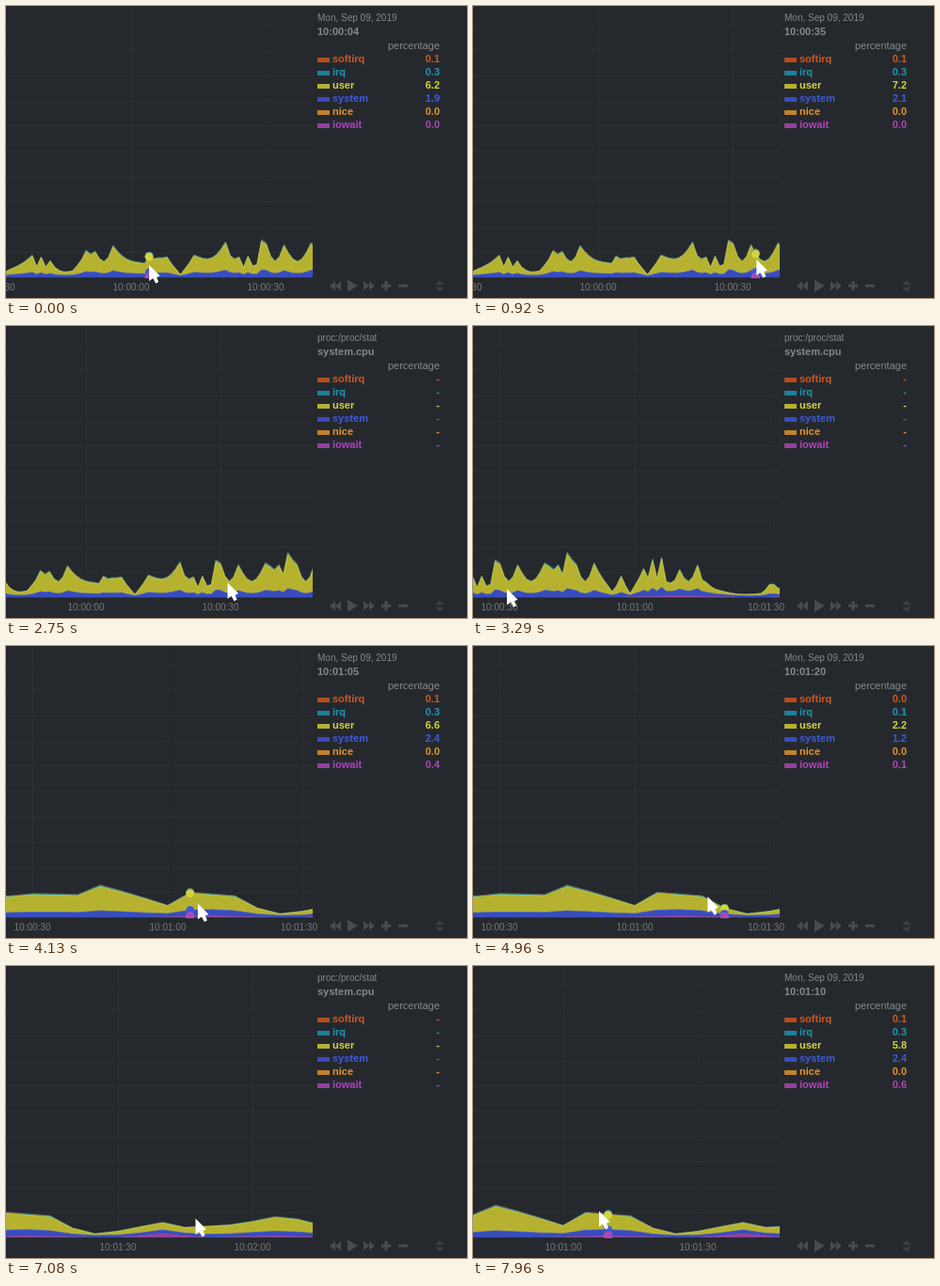
These frames come from a looping animation (490x311 px, 8000 ms). An HTML page with a canvas:

```html
<!DOCTYPE html>
<html lang="en">
<head>
<meta charset="utf-8">
<title>CPU chart</title>
<style>
html, body { margin: 0; width: 100%; height: 100%; overflow: hidden; background: #25292d; }
canvas { display: block; }
</style>
</head>
<body>
<canvas id="stage" width="490" height="311"></canvas>
<script>
const ctx = document.getElementById('stage').getContext('2d');
const LOOP = 8000, BASE = 289, RIGHT = 326, SEC = 4.78, PCT = 2.69;
const BACK = '#25292d', GREY = '#85888b', FONT = '"Liberation Sans", Arial, sans-serif';

// Stacked from top to bottom: name, line colour, fill colour
const series = [
  ['softirq', '#d4561a', '#b34d1e'], ['irq', '#1c96b4', '#1e8099'],
  ['user', '#d4d43a', '#b6b22f'], ['system', '#3f5adc', '#384cbc'],
  ['nice', '#e6932a', '#c0802b'], ['iowait', '#b044be', '#943fa2']
];

// Busy moments: second after 10:00:00, height in pixels
const peaks = [
  [-28, 6], [-22, 24], [-20, 22], [-18, 18], [-17, 11], [-13, 7], [-10, 29], [-9, 25],
  [-8, 28], [-4, 34], [3, 15], [4, 22.9], [5, 20], [6, 21], [7, 21], [8, 22], [11, 3],
  [14, 24], [21, 38], [24, 22], [26, 23], [28, 14], [29, 40], [30, 37], [34, 35], [40, 37],
  [41, 34], [42, 30], [43, 35], [45, 48], [46, 41], [47, 36], [51, 37], [55, 6], [57, 23],
  [59, 4], [62, 31], [64, 41], [66, 43], [67, 17], [70, 30], [74, 35], [76, 16], [80, 6],
  [88, 4], [90, 14], [91, 14]];

// Pointer tip: time, x, y
const pointer = [
  [0, 152, 276], [900, 305, 270], [1790, 149, 275], [1960, 149, 275], [2620, 284, 272],
  [3290, 36, 280], [3460, 45, 281], [3630, 45, 281], [4450, 305, 270], [4960, 250, 267],
  [5400, -36, 262], [5630, 283, 253], [6000, 300, 256], [6700, 85, 268], [6860, 125, 268],
  [7080, 201, 269], [7340, 322, 270], [7960, 134, 261]];
const drags = [[2620, 3290], [4980, 5400], [6860, 7340]];
const SETTLE = 70, LAG = 60;

const clamp = (v, lo, hi) => Math.max(lo, Math.min(hi, v));
const mix = (a, b, u) => a + (b - a) * u;
const bump = (s, mid, width) => Math.exp(-(((s - mid) / width) ** 2));

function span(keys, t) {
  const i = clamp(keys.findIndex(k => k[0] > t), 1, keys.length - 1);
  const last = keys[keys.length - 1];
  if (t >= last[0]) return [last, last, 0];
  const a = keys[i - 1], b = keys[i];
  return [a, b, (t - a[0]) / (b[0] - a[0])];
}

function tip(t) {
  const [a, b, u] = span(pointer, Math.max(0, t));
  return [mix(a[1], b[1], u), mix(a[2], b[2], u)];
}

// X of 10:00:00: every drag carries the chart along with the pointer
const originAt = t => drags.reduce(
  (x, [from, to]) => x + tip(clamp(t, from, to))[0] - tip(from)[0], 133);

// Stack height: sags between peaks of like size, then calm swells
function load(s) {
  if (s > 91) return 9.5 + 8 * bump(s, 98, 3) + 3 * bump(s, 110, 4) + 13.2 * bump(s, 124, 8);
  const [a, b, u] = span(peaks, s);
  const sag = .55 * Math.min(a[1], b[1]) / Math.max(a[1], b[1]);
  return mix(a[1], b[1], u) * (1 - sag * Math.sin(Math.PI * u));
}

// Mean load over the step seconds that end at s
function height(s, step) {
  let sum = 0;
  for (let k = 0; k < step; k++) sum += load(s - k);
  return sum / step;
}

// Percentages at second s, in the order of the series
function values(s, step) {
  const total = height(s, step) / PCT;
  const soft = .012 * total, irq = .035 * total;
  const sys = .45 + .17 * total + .4 * bump(s, 70, 9);
  const io = .6 * bump(s, 70, 8) + 1.5 * bump(s, 100, 5) + .6 * bump(s, 125, 8);
  return [soft, irq, Math.max(0, total - soft - irq - sys - io), sys, 0, io];
}

// Y of each series' upper edge
function edges(vals) {
  let sum = 0;
  return vals.slice().reverse().map(v => BASE - (sum += v) * PCT).reverse();
}

function clock(s) {
  const d = 36000 + s;
  return [d / 3600, d / 60 % 60, d % 60].map(n => String(Math.floor(n)).padStart(2, '0')).join(':');
}

function text(str, x, y, color, size = 11, bold = false, align = 'left') {
  ctx.font = `${bold ? 'bold ' : ''}${size}px ${FONT}`;
  ctx.textAlign = align;
  ctx.fillStyle = color;
  ctx.fillText(str, x, y);
}

function poly(points, color) {
  ctx.beginPath();
  points.forEach(p => ctx.lineTo(p[0], p[1]));
  ctx.closePath();
  ctx.fillStyle = color;
  ctx.fill();
}

function box(x, y, w, h, color) {
  ctx.fillStyle = color;
  ctx.fillRect(x, y, w, h);
}

function drawGrid(origin) {
  const grid = '#2b2f33';
  for (let i = 0; i <= 10; i++) box(0, Math.floor(BASE + .3 - i * 26.9), RIGHT, 1, grid);
  for (let s = -30; s <= 150; s += 30) {
    const x = Math.round(origin + s * SEC);
    if (x < -25 || x > RIGHT) continue;
    box(x, 0, 1, BASE, grid);
    text(clock(s), Math.min(x, 311.5), 303, '#76797c', 10, false, 'center');
  }
}

function drawAreas(origin, step) {
  const cols = [];
  const first = Math.max(-28, Math.floor(-origin / SEC / step) * step);
  for (let s = first; s <= 150; s += step) {
    cols.push({ x: origin + s * SEC, y: edges(values(s, step)) });
  }
  series.forEach(([name, line, fill], n) => {
    const top = cols.map(c => [c.x, c.y[n]]);
    poly([...top, [top[top.length - 1][0], BASE], [top[0][0], BASE]], fill);
    if (name === 'nice' || name === 'iowait') return; // mostly flat on the axis
    ctx.beginPath();
    top.forEach(p => ctx.lineTo(p[0], p[1]));
    ctx.strokeStyle = line;
    ctx.lineWidth = .7;
    ctx.stroke();
  });
}

function drawDots(x, vals) {
  edges(vals).forEach((y, n) => {
    ctx.beginPath();
    ctx.arc(x, y, 4.4, 0, 7);
    ctx.fillStyle = series[n][1];
    ctx.fill();
  });
}

function drawLegend(second, vals) {
  text(vals ? 'Mon, Sep 09, 2019' : 'proc:/proc/stat', 331, 16, GREY, 10);
  text(vals ? clock(second) : 'system.cpu', 331, 31, GREY, 11, true);
  text('percentage', 461, 46, GREY, 11, false, 'right');
  series.forEach(([name, color, fill], i) => {
    const y = 60 + 14 * i;
    box(331, y - 5, 13, 5, fill);
    text(name, 347, y, color, 11, true);
    text(vals ? vals[i].toFixed(1) : '-', 461, y, color, 11, true, 'right');
  });
}

function drawControls() {
  const c = '#484c50', dim = '#3b3f43';
  const tri = (x, w, h) => poly([[x, 298 - h], [x + w, 298], [x, 298 + h]], c);
  tri(350, -6, 5); tri(356, -6, 5);
  tri(363, 11, 6.5);
  tri(380, 6, 5); tri(386, 6, 5);
  box(399, 296.5, 10, 3, c); box(402.5, 293, 3, 10, c);
  box(417, 296.5, 10, 3, c);
  poly([[456, 297], [461, 292], [466, 297]], dim);
  poly([[456, 299.5], [461, 304.5], [466, 299.5]], dim);
}

function drawPointer([x, y]) {
  const shape = [[0, 0], [0, 17], [4, 14], [7, 19.5], [10, 18], [8, 13], [11.5, 11.5]];
  poly(shape.map(p => [x + p[0], y + p[1]]), '#fff');
}

function draw(t) {
  const origin = originAt(t);
  const step = t < drags[0][1] + SETTLE ? 1 : 5;
  const dragging = drags.some(([from, to]) => t >= from && t < to + SETTLE);
  box(0, 0, 490, 311, BACK);
  drawGrid(origin);

  ctx.save();
  ctx.beginPath();
  ctx.rect(0, 0, RIGHT, BASE + 1);
  ctx.clip();
  drawAreas(origin, step);
  let second, vals;
  if (!dragging) {
    // The hovered point trails the pointer a little
    const hover = clamp(tip(t - LAG)[0], 0, RIGHT);
    second = Math.round((hover - origin) / SEC / step) * step;
    vals = values(second, step);
    drawDots(origin + second * SEC, vals);
  }
  ctx.restore();

  drawLegend(second, vals);
  drawControls();
  drawPointer(tip(t));
}

const began = performance.now();
function tick() {
  draw((performance.now() - began) % LOOP);
  requestAnimationFrame(tick);
}
tick();
</script>
</body>
</html>
```
